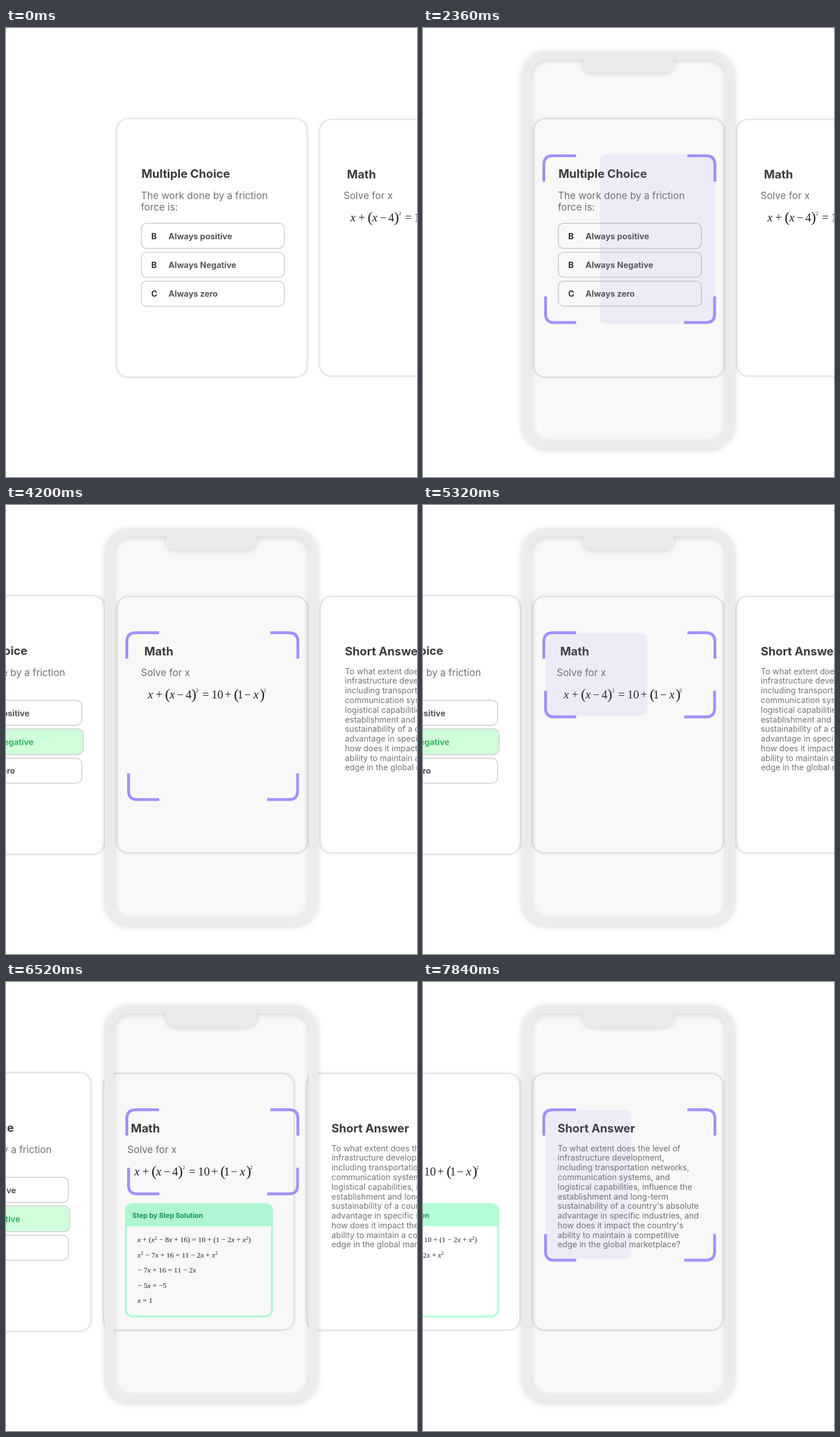
Recreate the animation shown at these times as an HTML page. Size 716x782 px, loop 8 s.

```html
<!DOCTYPE html>
<html lang="en">
<head>
<meta charset="utf-8">
<title>Question scanner</title>
<style>
  html, body { margin: 0; width: 100%; height: 100%; overflow: hidden; background: #fff; }
  svg { display: block; width: 716px; height: 782px; font-family: Inter, sans-serif; }

  .card { fill: #fff; stroke: #e0e0e0; stroke-width: 1.5; filter: drop-shadow(0 0 2px rgba(0, 0, 0, .13)); }
  .title { font-size: 20.2px; font-weight: 700; fill: #3b3b3d; }
  .question { font-size: 17px; fill: #737375; }
  .essay { font-size: 14.2px; fill: #737375; }
  .option rect { fill: #fff; stroke: #cbcbcd; stroke-width: 1.4; }
  .option text { font-size: 14.4px; font-weight: 700; fill: #565658; }
  .option .key { fill: #333; }
  .right rect { fill: #d0ffdb; }
  .right text { fill: #34b85f; }
  .math { font-family: "Liberation Serif", serif; fill: #222; }
  .math .var { font-style: italic; }
  .steps { font-size: 13px; }
  .sup { font-size: 9px; }

  .bezel { fill: #ededed; fill-opacity: .9; fill-rule: evenodd; filter: drop-shadow(0 2px 6px rgba(0, 0, 0, .17)); }
  .brackets { fill: none; stroke: #a092f6; stroke-width: 5; }
  .beam { fill: #9b80ff; fill-opacity: .1; }

  /* One loop is 8 s, so 1% is 80 ms. */
  .phone, .track, .brackets, .lower, .beam, .right, .solution { animation: 8s linear infinite both; }
  .phone { animation-name: rise; }
  .track { animation-name: slide; }
  .brackets { animation-name: show; }
  .lower { animation-name: resize; }
  .beam { animation-name: scan; }
  .right { animation-name: mark; }
  .solution { animation-name: solve; }

  @keyframes rise {
    0%, 6.6% { transform: translateY(770px); animation-timing-function: ease-out; }
    12.5%, 100% { transform: none; }
  }
  @keyframes slide {
    0%, 43.94% { transform: none; animation-timing-function: ease-in-out; }
    53% { transform: translateX(-355px); }
    80% { transform: translateX(-355px); animation-timing-function: ease-in-out; }
    88.75%, 100% { transform: translateX(-709px); }
  }
  @keyframes show {
    0%, 15.6% { opacity: 0; }
    20.5%, 100% { opacity: 1; }
  }
  @keyframes resize {
    0%, 52.9% { transform: none; animation-timing-function: ease-in-out; }
    58.5% { transform: translateY(-144px); }
    88.8% { transform: translateY(-144px); animation-timing-function: ease-in-out; }
    94.5%, 100% { transform: translateY(-28.5px); }
  }
  @keyframes scan {
    0%, 20.5% { x: 208px; y: 220px; width: 0; height: 295px; opacity: 1; animation-timing-function: ease-in-out; }
    25.5% { x: 208px; width: 301px; animation-timing-function: ease-in-out; }
    29.5%, 43.9% { x: 308px; y: 220px; width: 201px; height: 295px; opacity: 1; }
    46.2% { x: 308px; y: 220px; width: 201px; height: 295px; opacity: 0; }
    46.3%, 58.6% { x: 214px; y: 223px; width: 0; height: 144px; opacity: 1; animation-timing-function: ease-in-out; }
    64.9%, 65.6% { width: 295px; }
    66.5% { width: 178px; animation-timing-function: ease-out; }
    69.8% { x: 214px; y: 223px; width: 0; height: 144px; }
    69.9%, 96.1% { x: 214px; y: 223px; width: 0; height: 259px; animation-timing-function: ease-in; }
    98%, 100% { x: 214px; y: 223px; width: 149px; height: 259px; opacity: 1; }
  }
  @keyframes mark {
    0%, 33.6% { opacity: 0; }
    36%, 100% { opacity: 1; }
  }
  @keyframes solve {
    0%, 71.2% { opacity: 0; animation-timing-function: ease-in-out; }
    79.8%, 100% { opacity: 1; }
  }
</style>
</head>
<body>
<svg viewBox="0 0 716 782">
  <g class="track">
    <rect class="card" x="193" y="158" width="331.5" height="450" rx="20"/>
    <text class="title" x="236" y="261">Multiple Choice</text>
    <g id="prompt" class="question"></g>
    <g id="options"></g>

    <rect class="card" x="546.5" y="159.5" width="331.5" height="446.5" rx="20"/>
    <text class="title" x="594" y="262">Math</text>
    <text class="question" x="588" y="298">Solve for x</text>
    <g id="equation" class="math" transform="translate(600 337)"></g>
    <g class="solution">
      <rect x="585" y="387" width="255" height="195.5" rx="12" fill="#fff" stroke="#b3fdd7" stroke-width="3.5"/>
      <path d="M583.3 425.5V399q0-13.5 13.5-13.5H828q13.7 0 13.7 13.5V425.5Z" fill="#b3fdd7"/>
      <text x="596.5" y="410.5" font-size="11.8" font-weight="700" fill="#149c55">Step by Step Solution</text>
      <g id="steps" class="math steps"></g>
    </g>

    <rect class="card" x="900.5" y="159.5" width="331" height="446.5" rx="20"/>
    <text class="title" x="943.5" y="262">Short Answer</text>
    <g id="essay" class="essay"></g>
  </g>

  <g class="phone">
    <rect x="188" y="55" width="340" height="664" rx="28" fill-opacity=".028"/>
    <path class="bezel" d="M216 40H499a44 44 0 0 1 44 44V689a44 44 0 0 1-44 44H216a44 44 0 0 1-44-44V84a44 44 0 0 1 44-44Z
      M216 54.5H279V60q0 17.5 18 17.5H418q18 0 18-17.5V54.5H500a28 28 0 0 1 28 28V691a28 28 0 0 1-28 28H216a28 28 0 0 1-28-28V82.500a28 28 0 0 1 28-28Z"/>
  </g>

  <rect class="beam" rx="10"/>
  <g class="brackets">
    <path d="M210.500 267.500V238q0-15.500 15.500-15.500H266.500M460.500 222.500H493q15.500 0 15.500 15.500V267.500"/>
    <path class="lower" d="M213.500 467.500V498q0 15 15 15H267M455 513H493q15 0 15-15V467.500"/>
  </g>
</svg>
<script>
  const fill = (id, markup) => { document.getElementById(id).innerHTML = markup; };
  const lines = (x, y, gap, rows) =>
    rows.map((row, i) => `<text x="${x}" y="${y + i * gap}">${row}</text>`).join("");

  fill("prompt", lines(235, 298, 20, ["The work done by a friction", "force is:"]));

  const option = (key, label, y, grow = 0, type = "") => `
    <g class="option ${type}">
      <rect x="${235.7 - grow}" y="${y - grow / 4}" width="${249.3 + 2 * grow}" height="${43.5 + grow / 2}" rx="9"/>
      <text class="key" x="253" y="${y + 27.2}">${key}</text>
      <text x="283" y="${y + 27.2}">${label}</text>
    </g>`;
  fill("options",
    option("B", "Always positive", 340.3) +
    option("B", "Always Negative", 390.6) +
    option("C", "Always zero", 441) +
    option("B", "Always Negative", 390.6, 2.5, "right"));

  const tokens = [
    ["x", 0], ["+", 14], ["(", 30], ["x", 38], ["−", 51], ["4", 66], [")", 76], ["²", 84],
    ["=", 95], ["10", 111], ["+", 134], ["(", 150], ["1", 156], ["−", 168], ["x", 184], [")", 195], ["²", 201.5]
  ];
  const glyph = ([char, x]) => {
    if (char === "²") return `<text class="sup" x="${x}" y="-11">2</text>`;
    if ("()".includes(char)) return `<text x="${x}" y="1" font-size="26">${char}</text>`;
    return `<text class="${char === "x" ? "var" : ""}" x="${x}" font-size="20.500">${char}</text>`;
  };
  fill("equation", tokens.map(glyph).join(""));

  const typeset = row => row
    .replace(/x/g, '<tspan class="var">x</tspan>')
    .replace(/\^2/g, '<tspan class="sup" dy="-4.500">2</tspan><tspan dy="4.500">\u200b</tspan>');
  fill("steps", lines(605.5, 453, 26.5, [
    "x + (x^2 − 8x + 16) = 10 + (1 − 2x + x^2)",
    "x^2 − 7x + 16 = 11 − 2x + x^2",
    "− 7x + 16 = 11 − 2x",
    "− 5x = −5",
    "x = 1"
  ].map(typeset)));

  fill("essay", lines(943.5, 294.7, 16.77, [
    "To what extent does the level of",
    "infrastructure development,",
    "including transportation networks,",
    "communication systems, and",
    "logistical capabilities, influence the",
    "establishment and long-term",
    "sustainability of a country's absolute",
    "advantage in specific industries, and",
    "how does it impact the country's",
    "ability to maintain a competitive",
    "edge in the global marketplace?"
  ]));
</script>
</body>
</html>
```
